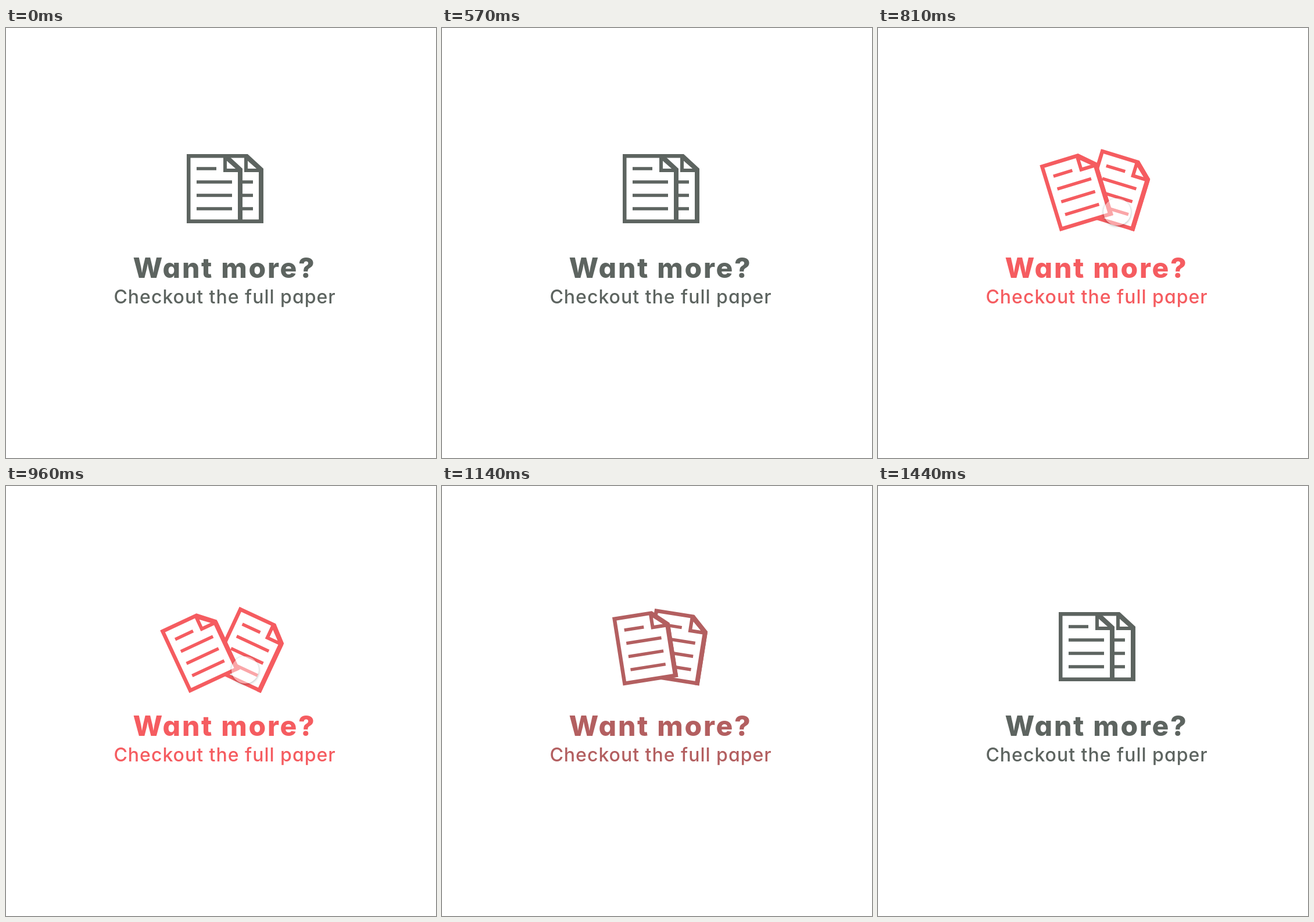
These frames come from a looping animation (740x740 px, 1.98 s). An HTML page:

```html
<!DOCTYPE html>
<html lang="en">
<head>
<meta charset="utf-8">
<title>Want more?</title>
<style>
  html, body { margin: 0; width: 100%; height: 100%; overflow: hidden; background: #fff; }
  svg { display: block; width: 100%; height: 100%; color: #5d6460; }
  text {
    fill: currentColor;
    font-family: Inter, "Open Sans", sans-serif;
    font-feature-settings: "cv11";
    text-anchor: middle;
  }
  .title { font-size: 48px; font-weight: 800; letter-spacing: 2.7px; }
  .sub { font-size: 32px; font-weight: 500; letter-spacing: 1px; }
  .page { stroke: currentColor; fill: none; }
  .sheet { fill: #fff; stroke-width: 6.5; }
  .edge { stroke-width: 8; }
  .fold { fill: #fff; stroke-width: 6; stroke-miterlimit: 1.9; }
  .lines { stroke-width: 5.5; }
  #cursor {
    position: absolute; left: 0; top: 0;
    width: 47px; height: 47px; margin: -23.5px;
    border-radius: 50%;
    background: rgba(255, 255, 255, .45);
    box-shadow: 0 1px 4px rgba(0, 0, 0, .32);
  }
</style>
</head>
<body>
<svg id="card" viewBox="0 0 740 740">
  <defs>
    <g id="page" class="page">
      <path class="sheet" d="M3.25 3.25H67.65L92.75 26.35V115.75H3.25Z"/>
      <path class="edge" d="M92 27V119"/>
      <path class="fold" d="M66 5V28H92Z"/>
      <path class="lines" d="M17 25H51M17 48H78M17 71H78M17 94H78"/>
    </g>
  </defs>
  <g id="back"><use href="#page" x="347" y="217"/></g>
  <g id="front"><use href="#page" x="311" y="217"/></g>
  <text class="title" x="376" y="430">Want more?</text>
  <text class="sub" x="376.5" y="474">Checkout the full paper</text>
</svg>
<div id="cursor"></div>
<script>
  const LOOP = 1980, STEP = 30;
  const GRAY = [93, 100, 96], RED = [245, 92, 96];

  const $ = id => document.getElementById(id);
  const card = $("card"), back = $("back"), front = $("front"), cursor = $("cursor");

  const ramp = (t, start, length) => Math.min(1, Math.max(0, (t - start) / length));
  const easeIn = x => x * x;
  const easeOut = x => 1 - (1 - x) ** 2;

  function draw(t) {
    // The pointer glides in, rests on the card, then speeds away
    const away = 1 - easeOut(ramp(t, 650, 125)) + easeIn(ramp(t, 1002, 138));
    cursor.style.transform = `translate(${411 + 24.5 * away}px, ${316 - 356 * away}px)`;

    const angle = 25 * (easeOut(ramp(t, 695, 265)) - easeOut(ramp(t, 1080, 150)));
    back.setAttribute("transform", `rotate(${angle} 395 336)`);
    front.setAttribute("transform", `rotate(${-angle} 359 336)`);

    const heat = ramp(t, 695, 110) - ramp(t, 1090, 115);
    card.style.color = `rgb(${GRAY.map((g, i) => Math.round(g + (RED[i] - g) * heat))})`;
  }

  const start = performance.now();
  function tick() {
    const t = (performance.now() - start) % LOOP;
    draw(Math.floor(t / STEP) * STEP);
    requestAnimationFrame(tick);
  }
  tick();
</script>
</body>
</html>
```
